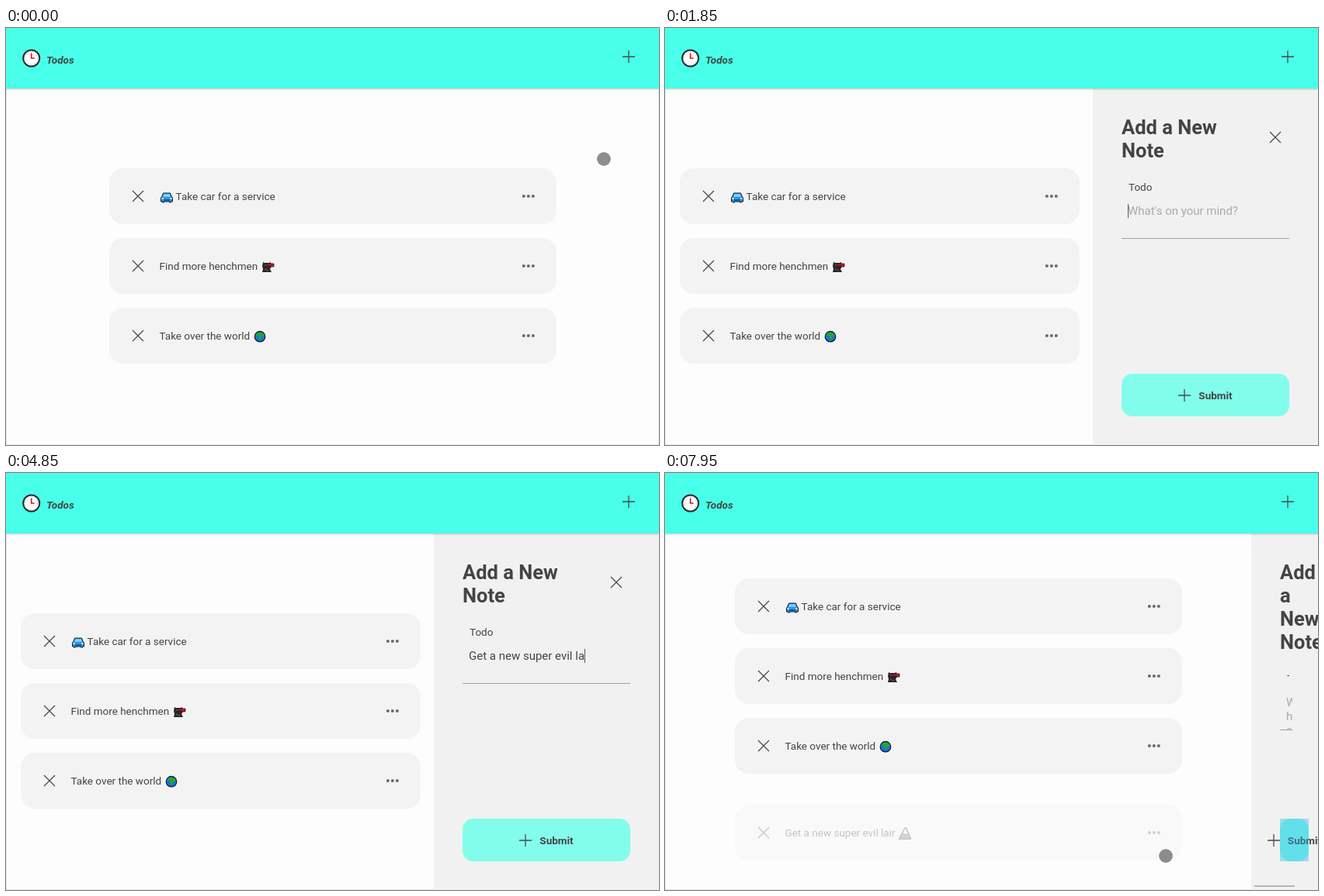
Animation, 841 px wide and 538 px high, one loop 8 s. Source, as an HTML page:

```html
<!DOCTYPE html>
<html lang="en">
<head>
<meta charset="utf-8">
<title>Todos</title>
<style>
* { box-sizing: border-box; margin: 0; }
html, body { width: 100%; height: 100%; overflow: hidden; }
body { position: relative; background: #fdfdfd; color: #444; font: 13.5px Roboto, sans-serif; }
svg { display: block; overflow: visible; flex: none; }
.line { fill: none; stroke: #4a4a4a; stroke-width: 1.3; }
#stage { position: absolute; left: 0; top: 0; width: 841px; height: 538px; overflow: hidden; }
#stage > * { position: absolute; }
#header { left: 0; top: 0; width: 841px; height: 78px; background: #48ffe9; box-shadow: 0 1px 2px rgba(0,0,0,.22); }
#header > * { position: absolute; }
#clock { left: 20px; top: 26px; }
#title { left: 52px; top: 33px; font-weight: 700; font-style: italic; line-height: 16px; }
#add { left: 784px; top: 19px; width: 36px; height: 40px; padding: 10px; }
.tap { background: rgba(51,181,229,.4); }
#frame { left: 0; top: 78px; width: 841px; height: 460px; border: 1px solid #e7e7e7; border-top: 0; }
.card { height: 72px; border-radius: 18px; background: #f3f3f3; line-height: 72px; white-space: nowrap; }
.card > * { position: absolute; }
.card .del { left: 29px; top: 28px; }
.card .more { right: 27px; top: 34px; }
.card p { left: 64.5px; top: 0; }
.emoji { display: inline-block; vertical-align: -5px; }
#panel { top: 78px; height: 460px; background: #f1f1f1; overflow: hidden; padding: 35px 37px 0; }
#head { display: flex; align-items: center; justify-content: space-between; }
h1 { font-size: 25.5px; line-height: 30px; font-weight: 700; }
#close { flex: none; width: 36px; padding: 0 0 4px 10px; }
#label { margin-top: 24px; padding-left: 9px; line-height: 16px; overflow: hidden; white-space: nowrap; }
#field { position: relative; margin-top: 14px; height: 45px; padding: 0 8px; border-bottom: 1px solid #a2a2a2;
  font-size: 15px; line-height: 18px; overflow: hidden; white-space: pre-wrap; overflow-wrap: anywhere; }
#field.empty { color: #aaa; }
#field.icon { top: 0; padding-top: 2px; }
#caret { position: absolute; width: 1px; height: 18px; background: #555; }
#submit { position: absolute; left: 37px; top: 368px; height: 55px; border-radius: 14px; background: #82fdec;
  display: flex; align-items: center; justify-content: center; gap: 10px; font-weight: 700; white-space: nowrap; }
#flash { position: absolute; left: 37px; top: 368px; height: 55px; }
#thumb { position: absolute; left: 4px; top: 454px; height: 2px; background: #b5b5b5; }
#cursor { width: 20px; height: 20px; margin: -10px 0 0 -10px; border-radius: 50%; background: rgba(0,0,0,.44);
  background-clip: padding-box; border: 1px solid rgba(255,255,255,.6); }
</style>
</head>
<body>
<div id="stage">
  <div id="frame"></div>
  <div id="panel">
    <div id="head"><h1>Add a New Note</h1><div id="close"></div></div>
    <div id="label">Todo</div>
    <div id="field"></div>
    <div id="submit"><span>Submit</span></div>
    <div id="flash" class="tap"></div>
    <div id="thumb"></div>
  </div>
  <div id="header"><div id="clock"></div><div id="title">Todos</div><div id="add"></div></div>
  <div id="cursor"></div>
</div>
<script>
const $ = id => document.getElementById(id);
const svg = (size, body, cls = '', box = size) =>
  `<svg class="${cls}" width="${size}" height="${size}" viewBox="0 0 ${box} ${box}">${body}</svg>`;
const emoji = body => svg(18, body, 'emoji');

const cross = svg(16, '<path d="M1 1l14 14M15 1L1 15"/>', 'line del');
const plus = svg(16, '<path d="M8 0v16M0 8h16"/>', 'line');
const dots = '<svg class="more" width="18" height="4" fill="#666">' +
  [1, 7, 13].map(x => `<rect x="${x}" y=".3" width="3.6" height="3.4" rx="1"/>`).join('') + '</svg>';

const car = emoji(`<path d="M4.5 4h9l2 5 1 1v5h-2v1h-2v-1h-7v1h-2v-1h-2v-5l1-1z" fill="#2598ee" stroke="#151a22"/>
  <path d="M5.2 5.2h7.6l1.2 3.6H4z" fill="#7fd0ff"/><path d="M2 11h3M13 11h3" stroke="#f4e9a0" stroke-width="1.5"/>
  <path d="M5 13h8" stroke="#123e70" stroke-width="1.4"/>`);
const ninja = emoji(`<path d="M3 3l2 1h6l2-1 1 6-2 3 2 4H2l1-4-1-4z" fill="#292727"/>
  <path d="M8 5h9v4h-3l-1-1H8z" fill="#c41227" stroke="#241012" stroke-width=".7"/>
  <path d="M5 7h3M5 12l5 2" stroke="#75665f"/>`);
const globe = emoji(`<circle cx="9" cy="9.2" r="6.8" fill="#1672dc" stroke="#111" stroke-width="1.1"/>
  <path d="M5 4.5l5-1 4 2 .5 3-3 1-1.500 4-2-2-1-3-3-1z" fill="#24a52f"/>`);
const hillArt = `<path d="M9 1.8h1.500L17 16.200H1z" fill="#777" stroke="#222"/>
  <path d="M9.500 2.500L13 9.500l-2-1-1.500 1.500-2-1.500-1.500 1z" fill="#f2f2f2"/>`;
const hill = emoji(hillArt);

$('clock').innerHTML = svg(26, `<circle cx="12.700" cy="13" r="10.500" fill="#fff" stroke="#2a2a2a" stroke-width="2"/>
  <circle cx="12.700" cy="13" r="8" fill="none" stroke="#999" stroke-dasharray="1 3.190"/>
  <path d="M12.700 6.500V13h4" fill="none" stroke="#c3212f" stroke-width="1.700"/>`);
$('add').innerHTML = plus;
$('close').innerHTML = cross;
$('submit').insertAdjacentHTML('afterbegin', plus);

const cards = [car + ' Take car for a service', 'Find more henchmen ' + ninja,
  'Take over the world ' + globe, 'Get a new super evil lair ' + hill].map(text => {
  const el = document.createElement('div');
  el.className = 'card';
  el.innerHTML = cross + `<p>${text}</p>` + dots;
  $('stage').insertBefore(el, $('panel'));
  return el;
});

const LOOP = 8000, STEP = 58.7, SAVED = 7890;
const note = 'Get a new super evil lair ';
const keyTimes = [1910, 1960, 2140, 2390,
  ...Array.from({length: 8}, (_, i) => 2570 + i * 92.8),
  3400, 3460, 3520, 3580, 3700, 3840, 3980, 4120, 4240, 4730, 4850, 4970, 5090, 5090];

const between = (t, a, b) => t >= a && t < b;

function track(t, points) {
  const start = points[0][0];
  const q = start + Math.floor((t - start) / STEP) * STEP;
  const i = points.findIndex(p => p[0] > q);
  if (i === 0) return points[0].slice(1);
  if (i < 0) return points[points.length - 1].slice(1);
  const a = points[i - 1], b = points[i], k = (q - a[0]) / (b[0] - a[0]);
  return a.slice(1).map((v, n) => v + (b[n + 1] - v) * k);
}

const opening = [[900, 0], [958, 0], [1017, 40], [1076, 120], [1134, 205], [1193, 255], [1252, 280], [1311, 290]];
const closing = [[SAVED, 205], [SAVED + STEP, 86]];
const toAdd = [[180, 770, 169], [480, 799, 62], [591, 807, 26], [649, 805, 35]];
const toSubmit = [[7180, 670, 330], [7475, 643, 415], [7592, 641, 460], [7708, 645, 494]];

function cursorAt(t) {
  if (t < 1300) return track(t, toAdd);
  if (between(t, 5650, 6320)) return [675.5, 233.5];
  if (t >= 7180) return track(t, toSubmit);
  return null;
}

function fieldHtml(t) {
  const caretOn = between(t, 1610, 5650) || between(t, 6140, 6690) || between(t, 7000, 7480);
  const caret = caretOn ? '<span id="caret"></span>' : '';
  const count = t >= SAVED ? 0 : keyTimes.filter(k => k <= t).length;
  if (!count) return caret + "What's on your mind?";
  const icon = t >= 7000 ? svg(20, hillArt, 'emoji', 18) : '';
  return note.slice(0, count) + icon + caret;
}

let shown = '';
function render(t) {
  const saved = t >= SAVED;
  const w = track(t, saved ? closing : opening)[0];
  const main = 841 - w, cardW = Math.min(576, main - 36);
  const left = Math.round(main / 2 + 0.5 - cardW / 2);
  const fade = saved ? Math.floor((t - SAVED) / STEP) * 0.3 : 0;

  cards.forEach((el, i) => {
    const extra = i === 3;
    const top = (saved ? 136 : 181) + i * 90 + (extra ? 31 * (1 - fade) : 0);
    el.style.cssText = `left:${left}px;top:${top}px;width:${cardW}px;opacity:${extra ? fade : 1}`;
  });

  $('panel').style.cssText = `left:${main}px;width:${w}px;display:${w ? 'block' : 'none'}`;
  const button = Math.max(w - 74, 37) + 'px';
  $('submit').style.width = $('flash').style.width = button;
  $('flash').style.display = saved ? 'block' : 'none';
  $('thumb').style.width = w < 172 ? w * w / 142 + 'px' : 0;
  $('add').className = between(t, 900, 1076) ? 'tap' : '';

  const html = fieldHtml(t);
  if (html !== shown) $('field').innerHTML = shown = html;
  $('field').className = t < keyTimes[0] || saved ? 'empty' : t >= 7000 ? 'icon' : '';

  const pos = cursorAt(t);
  $('cursor').style.cssText = pos ? `left:${pos[0]}px;top:${pos[1]}px` : 'display:none';
}

const began = performance.now();
function tick() {
  render((performance.now() - began) % LOOP);
  requestAnimationFrame(tick);
}
tick();
</script>
</body>
</html>
```
